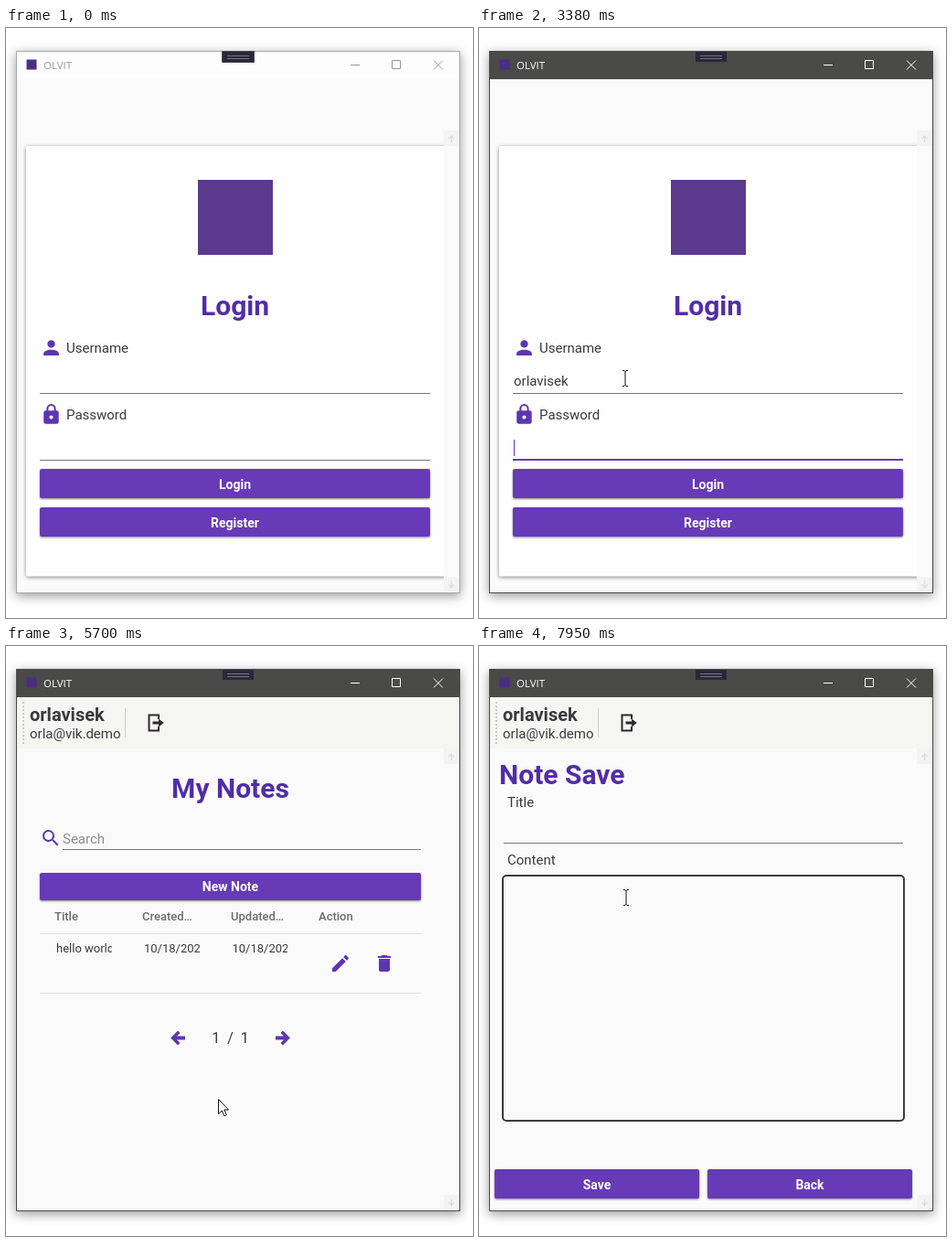
Recreate the animation shown at these times as an HTML page. Size 511 by 645 pixels, loop 8 s.

```html
<!DOCTYPE html>
<html lang="en">
<head>
<meta charset="utf-8">
<title>Notes app</title>
<style>
html, body { margin: 0; width: 100%; height: 100%; overflow: hidden; background: #fefefe; }
svg { display: block; }
text { font: 15px Roboto, sans-serif; fill: #3a3a3c; white-space: pre; }
.h { font-size: 30px; font-weight: 700; fill: #512da8; }
.btn text { font-size: 14px; font-weight: 700; fill: #fff; text-anchor: middle; }
.btn rect { fill: #673ab7; filter: drop-shadow(0 1px 1px #0007); }
.mid { text-anchor: middle; }
.col { font-size: 13px; font-weight: 500; fill: #6c6c6c; }
.cell { font-size: 13px; }
.icon { fill: #5e35b1; }
.line { stroke: #757575; }
.focus { stroke: #673ab7; stroke-width: 2; }
.caret { stroke: #673ab7; }
</style>
</head>
<body>
<svg width="511" height="645" viewBox="0 0 511 645">
  <defs>
    <clipPath id="page"><path d="M12 56H479V617H12Z"/></clipPath>
    <clipPath id="c1"><path d="M55 318h61v25H55Z"/></clipPath>
    <clipPath id="c2"><path d="M151 318h61v25h-61Z"/></clipPath>
    <clipPath id="c3"><path d="M248 318h60v25h-60Z"/></clipPath>
    <clipPath id="loginClip"><path d="M37 482H464V514H37Z"/></clipPath>
    <clipPath id="newClip"><path d="M37 248H454V278H37Z"/></clipPath>
  </defs>

  <rect x="11" y="25" width="486" height="593" fill="#fafafa" style="filter:drop-shadow(0 3px 6px #0006)"/>

  <g id="login" clip-path="url(#page)">
    <rect x="22" y="129" width="464" height="470.500" rx="2" fill="#fefefe" style="filter:drop-shadow(0 1px 2px #0007)"/>
    <rect x="210" y="166" width="82" height="82" fill="#5b3a8e"/>
    <text class="h mid" x="250.500" y="314">Login</text>
    <path class="icon" transform="translate(36.900 337) scale(1.050)" d="M12 4a4 4 0 1 1 0 8a4 4 0 1 1 0-8M12 14c4.420 0 8 1.790 8 4v2H4v-2c0-2.210 3.580-4 8-4Z"/>
    <text x="66" y="355">Username</text>
    <path class="icon" fill-rule="evenodd" transform="translate(37.100 410) scale(1.030)" d="M12 17a2 2 0 1 0 0-4a2 2 0 1 0 0 4M18 8a2 2 0 0 1 2 2v10a2 2 0 0 1-2 2H6a2 2 0 0 1-2-2V10a2 2 0 0 1 2-2h1V6a5 5 0 0 1 10 0v2ZM12 3a3 3 0 0 0-3 3v2h6V6a3 3 0 0 0-3-3Z"/>
    <text x="66" y="428">Password</text>
    <path class="line" d="M37 399.500H464M37 472.500H464"/>
    <path class="focus" id="userLine"/>
    <path class="focus" id="passLine"/>
    <text id="user" x="38" y="391"></text>
    <g id="dots" fill="#333"></g>
    <path class="caret" id="caret"/>
    <g class="btn">
      <rect x="37" y="482" width="427" height="32" rx="2"/>
      <circle id="loginRipple" cx="232" cy="497" fill="#fff" clip-path="url(#loginClip)"/>
      <text x="250.500" y="504">Login</text>
      <rect x="37" y="524" width="427" height="32" rx="2"/>
      <text x="250.500" y="546">Register</text>
    </g>
  </g>

  <g id="header">
    <path fill="#f5f5f4" d="M12 56H496V112H12Z"/>
    <path d="M19 61V107" stroke="#ccc" stroke-width="2" stroke-dasharray="2"/>
    <text x="26" y="82" style="font-size:20px;font-weight:700">orlavisek</text>
    <text x="26" y="101">orla@vik.demo</text>
    <path d="M130.500 68V100" stroke="#cfcfcf"/>
    <path d="M167 80V75.500H156.500V92.500H167V88" fill="none" stroke="#2f2a2d" stroke-width="2"/>
    <path d="M160.500 82.500H167V79.500L172.800 84L167 88.500V85.500H160.500Z" fill="#2f2a2d"/>
  </g>

  <g id="notes">
    <text class="h mid" x="245.500" y="166">My Notes</text>
    <path class="icon" fill-rule="evenodd" transform="translate(37 198)" d="M9.500 3A6.500 6.500 0 0 1 16 9.500c0 1.610-.590 3.090-1.560 4.230l.270.270h.790l5 5l-1.500 1.500l-5-5v-.790l-.270-.270A6.500 6.500 0 1 1 9.500 3m0 2a4.500 4.500 0 1 0 0 9a4.500 4.500 0 1 0 0-9Z"/>
    <text x="62" y="216" style="fill:#8c8c8c">Search</text>
    <path class="line" d="M62 222.500H454"/>
    <g class="btn">
      <rect x="37" y="248" width="417" height="30" rx="2"/>
      <circle id="newRipple" cx="161" cy="270" fill="#fff" clip-path="url(#newClip)"/>
      <text x="245.500" y="268">New Note</text>
    </g>
    <text class="col" x="53" y="300">Title</text>
    <text class="col" x="149" y="300">Created…</text>
    <text class="col" x="246" y="300">Updated…</text>
    <text class="col" x="342" y="300">Action</text>
    <path id="row" fill="#eee" d="M37 315H454V379H37Z"/>
    <path d="M37 314.500H454M37 379.500H454" stroke="#e2e2e2"/>
    <text class="cell" x="55" y="335" clip-path="url(#c1)">hello world</text>
    <text class="cell" x="151" y="335" clip-path="url(#c2)">10/18/2023</text>
    <text class="cell" x="247.500" y="335" clip-path="url(#c3)">10/18/2023</text>
    <path class="icon" transform="translate(354 335)" d="M20.710 7.040c.390-.390.390-1.040 0-1.410l-2.340-2.340c-.370-.390-1.020-.390-1.410 0l-1.840 1.830l3.750 3.750M3 17.250V21h3.750L17.810 9.930l-3.750-3.750Z"/>
    <path class="icon" transform="translate(402 335)" d="M19 4h-3.500l-1-1h-5l-1 1H5v2h14M6 19a2 2 0 0 0 2 2h8a2 2 0 0 0 2-2V7H6Z"/>
    <path class="icon" transform="translate(176 416.500)" d="M20 10v4h-9l3.500 3.500l-2.420 2.420L4.160 12l7.920-7.920L14.500 6.500L11 10Z"/>
    <path class="icon" transform="translate(315 416.500) scale(-1 1)" d="M20 10v4h-9l3.500 3.500l-2.420 2.420L4.160 12l7.920-7.920L14.500 6.500L11 10Z"/>
    <text class="mid" x="245.500" y="434" style="font-size:16px">1  /  1</text>
  </g>

  <g id="save">
    <text class="h" x="22" y="151">Note Save</text>
    <text x="31" y="176">Title</text>
    <path class="line" d="M27 215.500H464"/>
    <text x="31" y="239">Content</text>
    <rect x="26" y="251" width="439" height="268" rx="4" fill="none" stroke="#3c3c3e" stroke-width="2"/>
    <g class="btn">
      <rect x="17" y="572" width="224" height="32" rx="2"/><text x="129" y="594">Save</text>
      <rect x="250" y="572" width="224" height="32" rx="2"/><text x="362" y="594">Back</text>
    </g>
  </g>

  <path fill="#f3f3f3" d="M479 112h17v17h-17ZM479 600h17v17h-17Z"/>
  <path fill="none" stroke="#dedede" stroke-width="1.500" d="M487.500 125v-7m-3 3l3-3l3 3M487.500 604.500v7m-3-3l3 3l3-3"/>

  <path id="bar" d="M12 26H496V56H12Z"/>
  <rect x="22.500" y="34.500" width="11" height="11" fill="#4b2d83"/>
  <text id="name" x="41" y="45" style="font:11.500px 'Open Sans',sans-serif">OLVIT</text>
  <path id="winButtons" fill="none" d="M377 40.500h10M422.500 35.500h9v9h-9ZM468 35.500l10 10M478 35.500l-10 10"/>
  <rect id="frame" x="11.500" y="25.500" width="485" height="592" fill="none"/>
  <path fill="#2b2836" stroke="#4a4656" d="M236.500 25.500h35v12h-35Z"/>
  <path stroke="#77718a" d="M242 30.500h24M242 33.500h24"/>

  <g id="cursor">
    <path id="arrow" fill="#fff" stroke="#111" d="M.500 .500V16.500L4.200 13L6.800 18.700L9.300 17.600L6.800 12H11.500Z"/>
    <path id="hand" fill="#fff" stroke="#111" stroke-linejoin="round" d="M-.500 13V1.500Q1 -.800 2.500 1.500V7Q4.200 5.500 5.500 7.500Q7.300 6.500 8.200 8.500Q10.500 8 10.500 10.500V16Q10.500 18.500 8.500 20.500V23.500H.500V21Q-2 18.500 -5.500 13.500Q-5.500 10.500 -3 11.200Z"/>
    <path id="beam" fill="none" stroke="#111" d="M-3 -8.500H-1L0 -7.500L1 -8.500H3M0 -8V8M-3 8.500H-1L0 7.500L1 8.500H3"/>
  </g>
</svg>
<script>
const $ = id => document.getElementById(id);
const set = (el, attrs) => { for (const k in attrs) el.setAttribute(k, attrs[k]); };
const show = (id, on) => { $(id).style.display = on ? '' : 'none'; };
const clamp = v => Math.max(0, Math.min(1, v));

const LOOP = 8000, STEP = 76.9, DOT = 9.1;
const CLICK = 670, TAB = 3150, NOTES = 5620, SAVE = 7640;
const userName = 'orlavisek';
const userKeys = [980, 1210, 1280, 1530, 2290, 2380, 2550, 2690, 2920];
const passKeys = [3540, 3620, 3700, 3930, 4080, 4310, 4560, 4710];
const focusTimes = [CLICK, ...userKeys, TAB, ...passKeys];

// time, x, y of the pointer
const path = [
  [70, 300, 607], [300, 232, 500], [540, 160, 383],
  [4940, 160, 383], [5230, 232, 495],
  [5930, 232, 495], [6240, 269, 470], [6480, 262, 445], [6710, 240, 424],
  [6780, 233, 359], [7090, 176, 282], [7240, 161, 270], [7550, 161, 270],
  [SAVE, 161, 275]
];

const dots = passKeys.map((_, i) => {
  const c = document.createElementNS('http://www.w3.org/2000/svg', 'circle');
  set(c, { cx: 42.6 + DOT * i, cy: 460, r: 3.5 });
  return $('dots').appendChild(c);
});

function pointer(t) {
  const i = path.findLastIndex(p => p[0] <= t);
  const [t0, x0, y0] = path[Math.max(i, 0)];
  const [t1, x1, y1] = path[Math.min(i + 1, path.length - 1)];
  const u = t1 > t0 ? clamp(Math.floor((t - t0) / STEP + .05) * STEP / (t1 - t0)) : 0;
  return [Math.round(x0 + (x1 - x0) * u), Math.round(y0 + (y1 - y0) * u)];
}

function drawPointer(t, view) {
  const [x, y] = pointer(t);
  const inside = (top, bottom) => y >= top && y <= bottom && x > 36 && x < 464;
  const typing = t >= 980 && t < TAB || t >= passKeys[0] && t < 4940;
  show('cursor', t >= 70 && !typing);
  set($('cursor'), { transform: `translate(${x} ${y})` });
  let shape = 'arrow';
  if (view === 'login') {
    if (inside(375, 400) || inside(448, 473)) shape = 'beam';
    else if (inside(482, 514) || inside(524, 556)) shape = 'hand';
  } else if (view === 'notes') {
    if (inside(248, 278)) shape = 'hand';
  } else shape = 'beam';
  for (const id of ['arrow', 'hand', 'beam']) show(id, id === shape);
  show('row', inside(315, 379));
}

function underline(id, y, amount) {
  const half = 213.5 * amount;
  set($(id), { d: half ? `M${250.5 - half} ${y}H${250.5 + half}` : '' });
}

function ripple(id, t, start) {
  const u = clamp((t - start) / 300);
  set($(id), { r: u * 160, opacity: u ? .26 * (1 - u) : 0 });
}

function drawLogin(t) {
  const typed = userKeys.filter(k => k <= t).length;
  const hidden = passKeys.filter(k => k <= t).length;
  $('user').textContent = userName.slice(0, typed);
  dots.forEach((c, i) => { c.style.display = i < hidden ? '' : 'none'; });

  underline('userLine', 399, t < TAB ? clamp((t - CLICK) / 230) : clamp(1 - (t - TAB) / 230));
  underline('passLine', 472, clamp((t - TAB) / 230));

  const last = focusTimes.findLast(k => k <= t);
  show('caret', last !== undefined && (t - last) % 1060 < 530);
  const x = t < TAB ? 38 + (typed ? $('user').getComputedTextLength() : 0) : 38 + DOT * hidden;
  const top = t < TAB ? 377 : 450;
  set($('caret'), { d: `M${Math.floor(x) + .5} ${top}v18` });
  ripple('loginRipple', t, 5320);
}

function draw(t) {
  const view = t < NOTES ? 'login' : t < SAVE ? 'notes' : 'save';
  for (const id of ['login', 'notes', 'save']) show(id, id === view);
  show('header', view !== 'login');

  const active = t >= CLICK;
  set($('bar'), { fill: active ? '#4a4a48' : '#fdfdfd' });
  $('name').style.fill = active ? '#fff' : '#999';
  set($('winButtons'), { stroke: active ? '#fff' : '#999' });
  set($('frame'), { stroke: active ? '#4a4a48' : '#aaa' });

  if (view === 'login') drawLogin(t);
  ripple('newRipple', t, 7300);
  drawPointer(t, view);
}

const start = performance.now();
(function tick() {
  draw((performance.now() - start) % LOOP);
  requestAnimationFrame(tick);
})();
</script>
</body>
</html>
```
